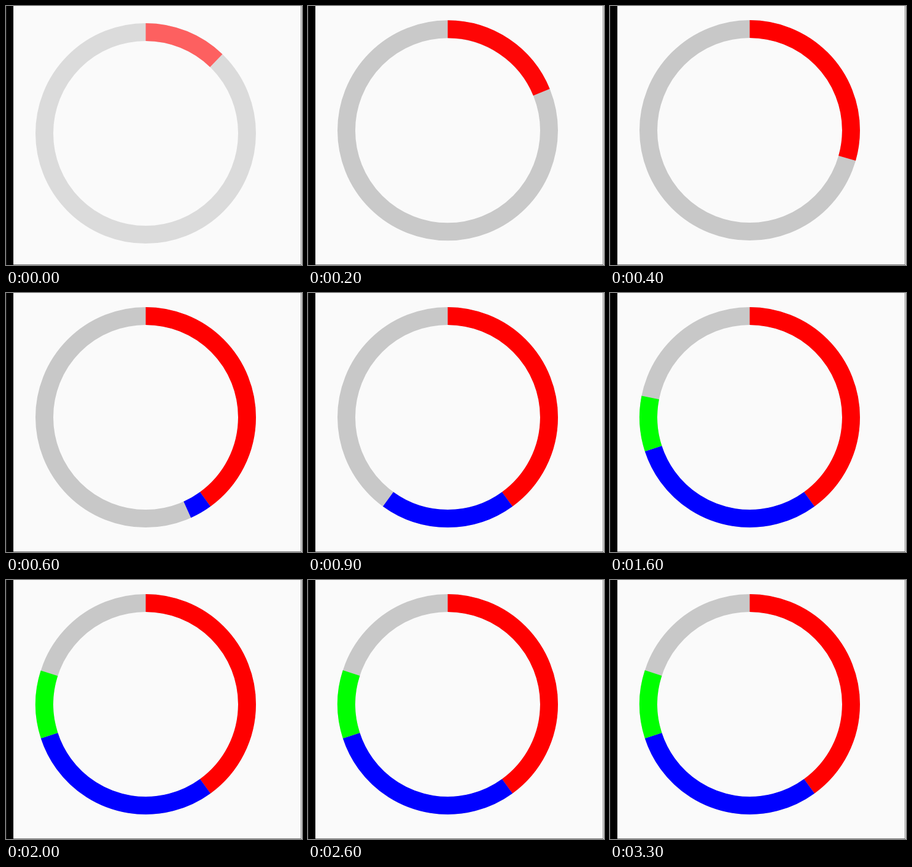
These frames come from a looping animation (482 by 422 pixels, 3600 ms). An HTML page with a canvas:

```html
<!DOCTYPE html>
<html>
<head>
<meta charset="utf-8">
<title>Ring chart</title>
<style>
html, body { margin: 0; width: 100%; height: 100%; overflow: hidden; background: #fafafa; }
.frame {
  position: absolute; inset: 0 1px 0 0; box-sizing: border-box;
  border: solid #777; border-width: 0 1px 1px 0;
}
.bar {
  position: absolute; left: 0; top: 0; bottom: 0; width: 11px;
  border-left: 1px solid #222; background: #000;
}
canvas { position: absolute; left: 0; top: 0; }
</style>
</head>
<body>
<div class="frame"></div>
<div class="bar"></div>
<canvas id="chart" width="482" height="422"></canvas>
<script>
const chart = document.getElementById('chart');
const ctx = chart.getContext('2d');
const LOOP = 3600, STEP = 100, LAST = 3300;
const SEGMENTS = [['#f00', 0, 0.4], ['#00f', 0.4, 0.7], ['#0f0', 0.7, 0.8]];
const TOTAL = 0.8;

// Progress of the sweep, as [ms, fraction], before easing
const PACE = [[0, 0.337], [200, 0.389], [600, 0.514], [1300, 0.722], [2000, 0.95], [2200, 1]];

const cubicInOut = u => u < 0.5 ? 4 * u ** 3 : 1 - 4 * (1 - u) ** 3;

function pace(t) {
  const i = PACE.findIndex(p => p[0] > t);
  if (i < 0) return 1;
  const [t0, u0] = PACE[i - 1], [t1, u1] = PACE[i];
  return u0 + (u1 - u0) * (t - t0) / (t1 - t0);
}

function arc(color, from, to, cy) {
  const angle = part => (part * 2 - 0.5) * Math.PI;
  ctx.strokeStyle = color;
  ctx.beginPath();
  ctx.arc(227.5, cy, 165, angle(from), angle(to));
  ctx.stroke();
}

function draw(t) {
  const swept = TOTAL * cubicInOut(pace(t));
  const settle = Math.exp(-t / 75);
  const cy = 202.5 + 5 * settle;

  chart.style.opacity = 1 - 0.39 * settle;
  ctx.clearRect(0, 0, 482, 422);
  ctx.lineWidth = 29;
  arc('#c8c8c8', 0, 1, cy);
  for (const [color, from, to] of SEGMENTS) {
    if (swept > from) arc(color, from, Math.min(swept, to), cy);
  }
}

const start = performance.now();
function tick() {
  const t = (performance.now() - start) % LOOP;
  draw(Math.min(Math.floor(t / STEP) * STEP, LAST));
  requestAnimationFrame(tick);
}
tick();
</script>
</body>
</html>
```
